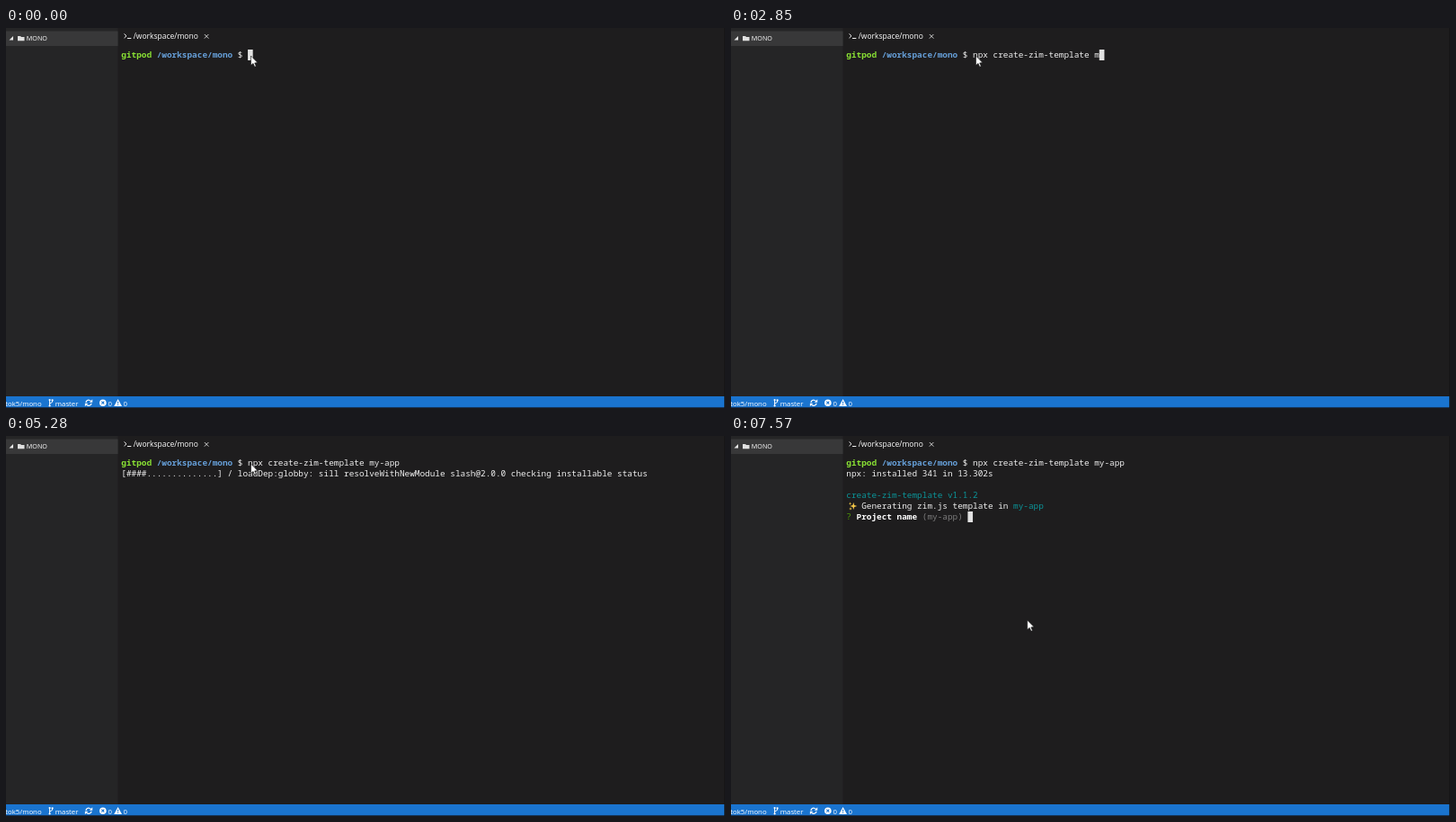
Write an HTML page with a canvas that moves like this. It is 800 px wide and 423 px high and loops after 8 s.

```html
<!DOCTYPE html>
<html lang="en">
<head>
<meta charset="utf-8">
<title>Terminal session</title>
<style>
  html, body { margin: 0; width: 100%; height: 100%; overflow: hidden; background: #1e1e1e; }
  canvas { display: block; width: 800px; height: 423px; }
</style>
</head>
<body>
<canvas id="stage"></canvas>
<script>
const W = 800, H = 423, LOOP = 8000, FPS = 7, LAST = 53;
const CELL = 5.63, LINE = 12, LEFT = 128.3, TOP = 24;
const MONO = '"Noto Sans Mono", "DejaVu Sans Mono", monospace';
const SANS = '"Open Sans", "Noto Sans", sans-serif';
const INK = '#f0f0f0', TEAL = '#0b9599', GREEN = '#8ae234', BLUE = '#669fd8';

const canvas = document.getElementById('stage');
const ctx = canvas.getContext('2d');
const dpr = window.devicePixelRatio || 1;
canvas.width = W * dpr;
canvas.height = H * dpr;

const COMMAND = 'npx create-zim-template my-app';
const ENTER = 24, PROGRESS = 25, INSTALLED = 47, GENERATING = 48, ASK = 49;

const load = (name, pkg) =>
  `loadDep:${name}: sill resolveWithNewModule ${pkg} checking installable status`;
const extract = (name, pkg) => `extract:${name}: sill extract ${pkg}`;
const refresh = name => `refresh-package-json:${name}: sill refresh-package-json ` +
  `/home/gitpod/.npm/_npx/6034/lib/node_modules/${name}`;
const rollback = 'rollbackFailedOptional: verb npm-session fbc5e38489e69a43';

// One entry per step: bar length, spinner, message
const progress = [
  [0, '|', rollback],
  [0, '/', rollback],
  [0, '-', rollback],
  [0, '\\', rollback],
  [1, '|', 'fetchMetadata: sill resolveWithNewModule chalk@2.4.2'],
  [1, '/', load('configstore', 'dot-prop@4.2.0')],
  [2, '-', load('inquirer', 'figures@2.0.0')],
  [2, '\\', load('rxjs', 'tslib@1.10.0')],
  [2, '/', load('through', 'jsonfile@4.0.0')],
  [3, '-', load('fs-extra', 'universalify@0.1.2')],
  [3, '\\', load('supports-color', 'has-flag@3.0.0')],
  [4, '|', load('micromatch', 'braces@2.3.2')],
  [4, '/', load('globby', 'slash@2.0.0')],
  [5, '-', load('is-glob', 'is-extglob@2.1.1')],
  [6, '\\', extract('boxen', 'camelcase@4.1.0')],
  [7, '|', extract('widest-line', 'string-width@2.1.1')],
  [8, '/', extract('braces', 'array-unique@0.3.2')],
  [9, '|', extract('ansi-align', 'resolve-from@4.0.0')],
  [10, '/', extract('term-size', 'execa@0.7.0')],
  [11, '-', extract('rxjs', 'rxjs@6.5.2')],
  [12, '|', refresh('micromatch')],
  [12, '/', refresh('nanomatch')]
];

// Pointer tip: step, x, y
const pointerPath = [
  [40, 272.5, 31], [41, 290, 79], [42, 311.5, 132.5],
  [43, 322, 172], [44, 328, 197], [45, 329.7, 205]
];

function rect(x, y, w, h, color) {
  ctx.fillStyle = color;
  ctx.fillRect(x, y, w, h);
}

function poly(points, fill, stroke, width = 1) {
  ctx.beginPath();
  points.forEach(([x, y], i) => i ? ctx.lineTo(x, y) : ctx.moveTo(x, y));
  if (fill) {
    ctx.closePath();
    ctx.fillStyle = fill;
    ctx.fill();
  }
  if (stroke) {
    ctx.strokeStyle = stroke;
    ctx.lineWidth = width;
    ctx.stroke();
  }
}

function arc(x, y, r, from = 0, to = Math.PI * 2) {
  ctx.beginPath();
  ctx.arc(x, y, r, from, to);
}

function label(str, x, y, size, align = 'left', weight = 400) {
  ctx.font = `${weight} ${size}px ${SANS}`;
  ctx.textAlign = align;
  ctx.fillStyle = '#fff';
  ctx.fillText(str, x, y);
}

// Terminal text sits on a fixed character grid
function print(str, col, row, color = INK, bold = false) {
  ctx.font = `${bold ? 700 : 400} 9.38px ${MONO}`;
  ctx.textAlign = 'left';
  ctx.fillStyle = color;
  [...str].forEach((ch, i) => {
    const x = LEFT + (col + i) * CELL;
    if (x < W) ctx.fillText(ch, x, TOP + row * LINE + 9.2);
  });
}

function block(col, row) {
  rect(LEFT + col * CELL, TOP + row * LINE, CELL, LINE, '#e2e2e2');
}

function drawSidebar() {
  rect(0, 0, 124.5, 410, '#252526');
  rect(0, 3.5, 124.5, 16.5, '#383839');
  poly([[8, 9], [8, 13.5], [3.5, 13.5]], '#e8e8e8');
  poly([[13, 9], [16, 9], [17, 10], [20.5, 10], [20.5, 14.3], [13, 14.3]], '#e0e0e0');
  label('MONO', 22.8, 14.2, 7.2);
}

function drawTab() {
  poly([[131.5, 6.5], [134, 8.8], [131.5, 11.1]], null, '#eee', 1);
  rect(135, 11, 4.3, 1, '#eee');
  label('/workspace/mono', 141.7, 12.1, 8.5, 'left', 500);
  poly([[220.8, 7], [225.4, 11.6]], null, '#ddd', 0.9);
  poly([[225.4, 7], [220.8, 11.6]], null, '#ddd', 0.9);
}

function drawStatus() {
  rect(0, 410, W, 12.3, '#1a74cf');
  rect(0, 422.2, W, 0.8, '#14345a');
  label('tok5/mono', 39.6, 420.6, 7.8, 'right');
  label('master', 54.8, 420.6, 7.8);
  label('0', 113.4, 420.6, 7.8);
  label('0', 130.6, 420.6, 7.8);

  // Branch
  poly([[48.6, 414], [48.6, 420.5]], null, '#fff', 1);
  poly([[51.6, 414.5], [51.6, 416.3], [48.6, 418.2]], null, '#fff', 1);
  ctx.fillStyle = '#fff';
  for (const [x, y] of [[48.6, 414], [51.6, 414.3], [48.6, 420.5]]) {
    arc(x, y, 1.1);
    ctx.fill();
  }

  // Sync
  ctx.strokeStyle = '#fff';
  ctx.lineWidth = 1.2;
  arc(92, 417.3, 3.1, Math.PI * 1.05, Math.PI * 1.8);
  ctx.stroke();
  arc(92, 417.3, 3.1, Math.PI * 0.05, Math.PI * 0.8);
  ctx.stroke();
  poly([[96.2, 413.3], [96.2, 416.8], [92.8, 416.8]], '#fff');
  poly([[87.9, 421.2], [87.9, 417.8], [91.3, 417.8]], '#fff');

  // Errors and warnings
  arc(107.8, 417.2, 3.8);
  ctx.fillStyle = '#fff';
  ctx.fill();
  poly([[106.3, 415.7], [109.3, 418.7]], null, '#1a74cf', 1.1);
  poly([[109.3, 415.7], [106.3, 418.7]], null, '#1a74cf', 1.1);
  poly([[124.6, 413], [129, 421], [120.2, 421]], '#fff');
  rect(124.1, 415.7, 1, 2.6, '#1a74cf');
  rect(124.1, 419, 1, 1, '#1a74cf');
}

function sparkle(x, y, r) {
  const points = Array.from({ length: 8 }, (_, i) => {
    const d = i % 2 ? r * 0.32 : r, a = i * Math.PI / 4;
    return [x + d * Math.sin(a), y - d * Math.cos(a)];
  });
  poly(points, '#f7c948');
}

function drawTerminal(step) {
  print('gitpod', 0, 0, GREEN, true);
  print('/workspace/mono', 7, 0, BLUE, true);
  print('$', 23, 0);

  const typed = step >= ENTER ? COMMAND.length : Math.floor(step * 18 / 14);
  print(COMMAND.slice(0, typed), 25, 0);
  if (step < ENTER) block(25 + typed, 0);
  else if (step < PROGRESS) block(0, 1);
  else if (step < INSTALLED) {
    const [done, spin, message] = progress[step - PROGRESS];
    print(`[${'#'.repeat(done).padEnd(18, '.')}] ${spin} ${message}`, 0, 1);
  } else drawSetup(step);
}

function drawSetup(step) {
  print('npx: installed 341 in 13.302s', 0, 1);
  if (step < GENERATING) {
    block(0, 2);
    return;
  }
  print('create-zim-template v1.1.2', 0, 3, TEAL);
  sparkle(136.3, 78, 4);
  sparkle(132.6, 75.2, 1.8);
  sparkle(133, 81, 1.8);
  print('Generating zim.js template in', 3, 4);
  print('my-app', 33, 4, TEAL);
  if (step < ASK) {
    block(0, 5);
    return;
  }
  print('?', 0, 5, '#4e9a06');
  print('Project name', 2, 5, '#fff', true);
  print('(my-app)', 15, 5, '#7c7c7c');
  block(24, 5);
}

function drawPointer(step) {
  const i = Math.max(0, Math.min(pointerPath.length - 1, step - pointerPath[0][0]));
  const [, x, y] = pointerPath[i];
  const arrow = [[0, 0], [0, 10.6], [2.5, 8.4], [4.2, 12.3], [5.8, 11.6], [4.2, 7.9], [7.4, 7.6], [0, 0]];
  poly(arrow.map(([dx, dy]) => [x + dx, y + dy]), '#fff', '#111', 0.6);
}

function draw(now) {
  const t = now % LOOP;
  const step = Math.min(LAST, Math.floor((t + 8) * FPS / 1000));
  ctx.setTransform(dpr, 0, 0, dpr, 0, 0);
  rect(0, 0, W, H, '#1e1d1e');
  drawSidebar();
  drawTab();
  drawTerminal(step);
  drawStatus();
  rect(799.2, 0, 0.8, H, '#141414');
  drawPointer(step);
  requestAnimationFrame(tick);
}

let start;
function tick(now) {
  start ??= now;
  draw(now - start);
}
requestAnimationFrame(tick);
</script>
</body>
</html>
```
